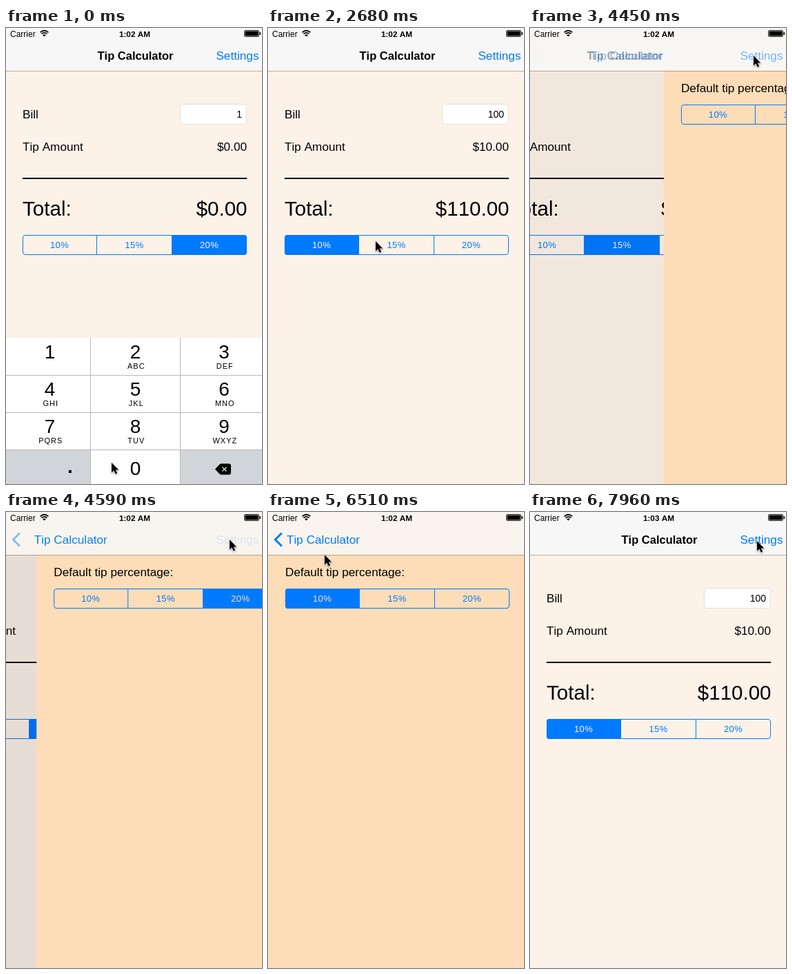
Write an HTML page that moves like this. It is 371 by 661 pixels and loops after 8000 ms.

```html
<!DOCTYPE html>
<html lang="en">
<head>
<meta charset="utf-8">
<title>Tip Calculator</title>
<style>
  html, body { margin: 0; width: 100%; height: 100%; overflow: hidden; background: #fdf2e8; }
  svg { display: block; width: 100vw; height: 100vh; }
  text { font-family: "Liberation Sans", Arial, sans-serif; font-kerning: none; white-space: pre; }
</style>
</head>
<body>
<svg id="stage" viewBox="0 0 371 661"></svg>
<script>
const BLUE = '#007aff', CREAM = '#fdf2e8', PEACH = '#fdddb8', KEY_GREY = '#d1d4d9';
const LOOP = 8000;
const stage = document.getElementById('stage');

function el(tag, attrs, parent = stage, content) {
  const node = document.createElementNS('http://www.w3.org/2000/svg', tag);
  for (const k in attrs) node.setAttribute(k, attrs[k]);
  if (content !== undefined) node.textContent = content;
  parent.appendChild(node);
  return node;
}
const rect = (parent, x, y, width, height, fill, more) =>
  el('rect', { x, y, width, height, fill, ...more }, parent);
const label = (parent, x, y, size, str, more) =>
  el('text', { x, y, 'font-size': size, ...more }, parent, str);
const group = parent => el('g', {}, parent);
const END = { 'text-anchor': 'end' }, MID = { 'text-anchor': 'middle' };
const move = (node, x, y) => node.setAttribute('transform', `translate(${x} ${y})`);

// Segmented control; returns a function that selects a part.
function segments(parent, x, y, paper) {
  const edges = [0, 107, 216, 325], id = 'round' + y;
  rect(el('clipPath', { id }, parent), x, y, 325, 29, '#000', { rx: 4 });
  const fill = rect(parent, x, y, 0, 29, BLUE, { 'clip-path': `url(#${id})` });
  rect(parent, x + .5, y + .5, 324, 28, 'none', { rx: 3.5, stroke: BLUE });
  for (const e of edges.slice(1, 3)) rect(parent, x + e, y, 1, 29, BLUE);
  const names = ['10%', '15%', '20%'].map((s, i) =>
    label(parent, x + 53.5 + i * 108.5, y + 19, 13, s, { ...MID, 'letter-spacing': .4 }));
  return sel => {
    fill.setAttribute('x', x + edges[sel]);
    fill.setAttribute('width', edges[sel + 1] - edges[sel] + (sel < 2 ? 1 : 0));
    names.forEach((t, i) => t.setAttribute('fill', i === sel ? paper : BLUE));
  };
}

// Calculator screen
const main = group();
rect(main, 0, 0, 371, 661, CREAM);
label(main, 24, 131, 17.2, 'Bill');
rect(main, 252.5, 110.5, 96, 29, '#fff', { rx: 4, stroke: '#e5e1dc' });
const bill = label(main, 342, 130, 14, '', END);
label(main, 24, 178, 17.2, 'Tip Amount');
const tip = label(main, 349, 178, 17.2, '', END);
rect(main, 24, 217, 325, 2, '#000');
label(main, 24, 271.5, 29.6, 'Total:', { style: 'font-kerning:normal' });
const total = label(main, 349.5, 271.5, 29.5, '', END);
const pickRate = segments(main, 24, 300, CREAM);

// Number pad
const pad = group(main);
rect(pad, 0, 449, 371, 216, '#fff');
rect(pad, 0, 611, 122, 54, KEY_GREY);
rect(pad, 253, 611, 118, 54, KEY_GREY);
const zeroKey = rect(pad, 123, 612, 129, 53, '#fff');
const letters = ['', 'ABC', 'DEF', 'GHI', 'JKL', 'MNO', 'PQRS', 'TUV', 'WXYZ'];
const cols = [63.5, 187.5, 316];
letters.forEach((s, i) => {
  const x = cols[i % 3], y = 449 + 54 * Math.floor(i / 3);
  label(pad, x, y + 30, 28, i + 1, MID);
  label(pad, x + 1.3, y + 45, 11, s, { ...MID, 'letter-spacing': 1 });
});
label(pad, 187.5, 648, 28, '0', MID);
label(pad, 93, 645, 28, '.', { ...MID, 'font-weight': 'bold' });
for (const y of [503, 557, 611]) rect(pad, 0, y, 371, 1, '#b8b8bb');
for (const x of [122, 252]) rect(pad, x, 449, 1, 216, '#b8b8bb');
el('path', { d: 'M303 639.5L309.5 632.5Q310.5 631.5 312 631.5H323Q326 631.5 326 634.5V644.5Q326 647.5 323 647.5H312Q310.500 647.500 309.5 646.5Z' }, pad);
el('path', { d: 'M313.5 636.500l6 6m0-6l-6 6', stroke: KEY_GREY, 'stroke-width': 1.5 }, pad);

const dim = rect(stage, 0, 0, 371, 661, '#000');

// Settings screen
const prefs = group();
rect(prefs, 0, 0, 371, 661, PEACH);
label(prefs, 25, 92.5, 17.2, 'Default tip percentage:');
const pickDefault = segments(prefs, 25, 111, PEACH);

// Navigation and status bars
rect(stage, 0, 0, 371, 62, '#f7f7f7');
const barTint = rect(stage, 0, 0, 371, 62, '#f9f5ee');
rect(stage, 0, 62, 371, 1, '#000', { opacity: .27 });
const title = label(stage, 0, 46, 16.5, 'Tip Calculator', { 'font-weight': 'bold' });
const back = label(stage, 0, 46, 17.2, 'Tip Calculator', { fill: BLUE });
const chevron = el('path', { d: 'M20 30.500L10.500 40L20 49.500', fill: 'none', stroke: BLUE, 'stroke-width': 3 });
const link = label(stage, 366.5, 46, 17.2, 'Settings', { ...END, fill: BLUE });
label(stage, 6, 12.5, 12, 'Carrier');
el('path', { d: 'M49.600 6.300Q55.500 1.200 61.400 6.300M51.600 8.500Q55.500 5.200 59.400 8.500', fill: 'none', stroke: '#000', 'stroke-width': 1.7 });
el('path', { d: 'M53.200 10.200Q55.500 8.400 57.800 10.200L55.500 12.600Z' });
const clock = label(stage, 186.5, 12.5, 11.8, '', { ...MID, 'font-weight': 'bold' });
rect(stage, 345.5, 3.5, 21, 9, 'none', { rx: 1.5, stroke: '#000', 'stroke-width': .8 });
rect(stage, 346.5, 4.5, 19, 7, '#000');
rect(stage, 367.5, 6, 1.700, 4, '#000', { rx: .8 });

const cursor = el('path', {
  d: 'M0 0V14.500L3.400 11.400L5.700 16.600L8.200 15.500L5.900 10.500H10.300Z',
  stroke: '#fff', 'stroke-width': 1.1, 'paint-order': 'stroke',
  style: 'filter:drop-shadow(0 1px 1px rgba(0,0,0,.4))'
});

// Pointer stops: beat, x, y
const path = [
  [0, 153, 630], [4, 153, 630], [7, 163, 380], [10, 163, 380], [14, 84, 309], [16, 90, 309],
  [18, 156, 309], [20, 160, 309], [24, 328, 37], [25, 328, 15], [26, 328, 15], [28, 324, 40],
  [31, 324, 40], [34, 236, 122], [36, 196, 119], [38, 196, 119], [41, 84, 127], [42, 84, 127],
  [44, 82, 62], [46, 30, 42], [47, 30, 42], [52, 325, 44], [53, 329, 43], [54, 329, 42]
];
// Values that switch at a beat
const bills = [[0, '1'], [2, '10'], [4, '100']];
const rates = [[0, 2], [15, 0], [20, 1], [47, 0]];
const defaults = [[0, 2], [38, 1], [42, 0]];
const at = (table, n) => table.filter(row => row[0] <= n).pop()[1];

// The screen is refreshed in beats of about 147 ms.
const beat = t => t < 1343 ? Math.min(8, Math.floor(t / 150)) : 9 + Math.floor((t - 1343) / 146.8);

function spring(beats) {
  if (beats <= 0) return 0;
  const w = 2.06 * beats, p = 1 - (1 + w) * Math.exp(-w);
  return p > .998 ? 1 : p;
}

function pointer(n) {
  const i = path.findIndex(stop => stop[0] >= n);
  if (i < 1) return path[0].slice(1);
  const [a, ax, ay] = path[i - 1], [b, bx, by] = path[i];
  const u = (n - a) / (b - a), e = u * u * (3 - 2 * u);
  return [ax + (bx - ax) * e, ay + (by - ay) * e];
}

function draw(n) {
  const rate = at(rates, n), tipValue = n < 9 ? 0 : 10 + 5 * rate;
  bill.textContent = at(bills, n);
  tip.textContent = '$' + tipValue.toFixed(2);
  total.textContent = '$' + (n < 9 ? 0 : 100 + tipValue).toFixed(2);
  pickRate(rate);
  pickDefault(at(defaults, n));
  clock.textContent = n < 49 ? '1:02 AM' : '1:03 AM';
  zeroKey.setAttribute('fill', n === 1 || n === 3 ? KEY_GREY : '#fff');
  move(pad, 0, 212 * spring(n - 8.22));

  const p = spring(n - 29.22) - spring(n - 47.3);
  move(main, -111 * p, 0);
  move(prefs, 371 * (1 - p), 0);
  dim.setAttribute('opacity', .1 * p);
  barTint.setAttribute('opacity', p);
  move(title, 27 + 105.5 * (1 - p), 0);
  move(back, 27 + 115 * (1 - p), 0);
  title.setAttribute('opacity', Math.max(0, 1 - 1.4 * p));
  back.setAttribute('opacity', Math.min(1, 1.1 * p));
  chevron.setAttribute('opacity', p ** 6);
  link.setAttribute('opacity', 1 - p);
  move(cursor, ...pointer(n));
}

const start = performance.now();
function tick() {
  draw(beat((performance.now() - start) % LOOP));
  requestAnimationFrame(tick);
}
tick();
</script>
</body>
</html>
```
